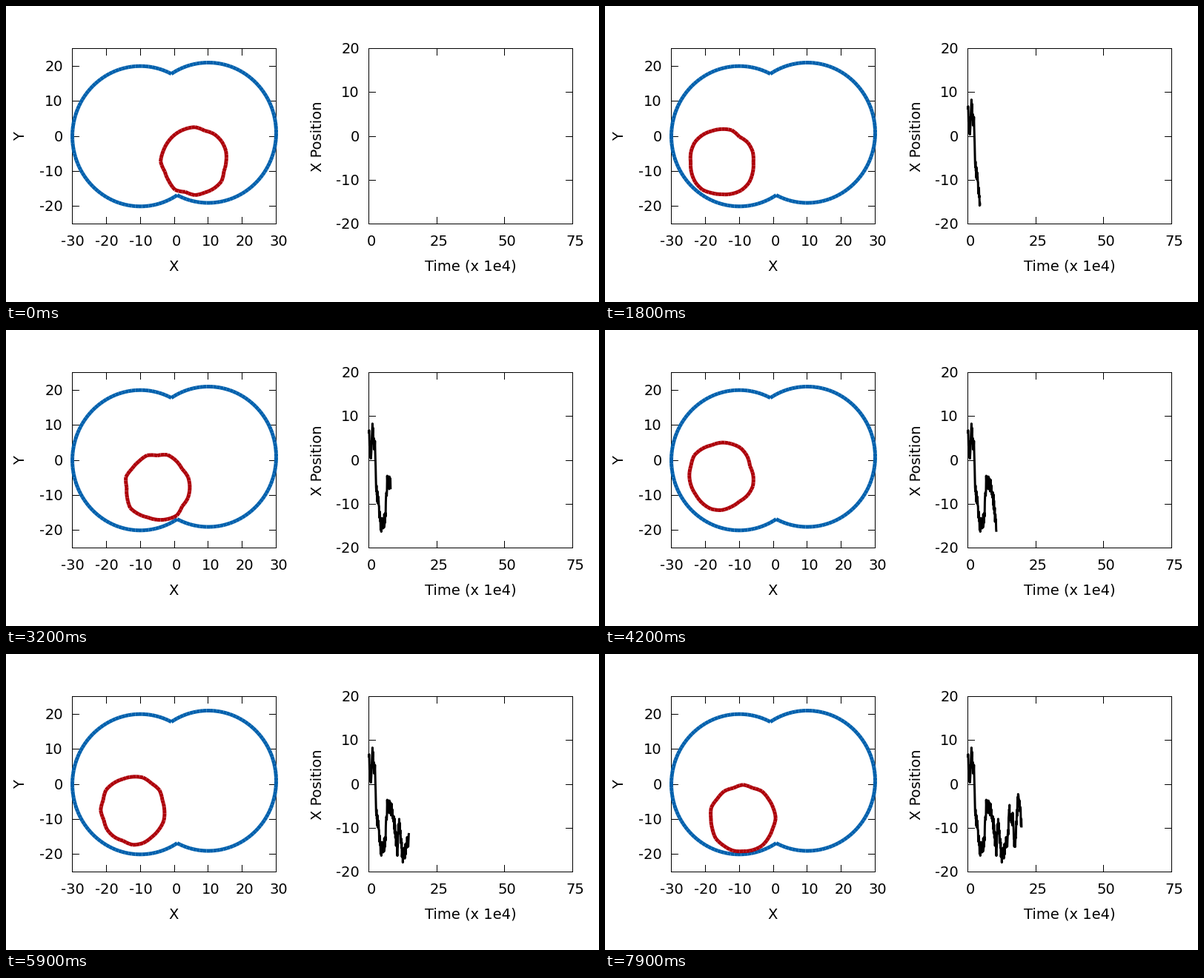
Write a matplotlib script that moves like this. It is 800 px wide and 400 px high and loops after 8 s.

```python
import numpy as np
import matplotlib.pyplot as plt
from matplotlib.animation import FuncAnimation
from matplotlib.collections import LineCollection

W, H, DPI = 800, 400, 100
FRAMES, STEP_MS = 80, 100
PX = 72 / DPI  # points per pixel
BLUE, RED = "#0060ad", "#ad0009"
TOP, BOTTOM, WIDE, TICK = 57.5, 294.5, 275, 9

plt.rcParams["font.family"] = "DejaVu Sans"
fig = plt.figure(figsize=(W / DPI, H / DPI), dpi=DPI, facecolor="white")
ax = fig.add_axes([0, 0, 1, 1])
ax.set_xlim(0, W)
ax.set_ylim(H, 0)
ax.axis("off")


def label(x, y, s, **kw):
    ax.text(x, y, s, fontsize=14, color="black", va="baseline", **kw)


def line(xs, ys):
    """One-pixel line, moved onto pixel centres."""
    ax.plot(np.floor(xs) + 0.5, np.floor(ys) + 0.5, color="black", lw=PX,
            zorder=1, snap=False, solid_capstyle="projecting")


class Panel:
    """Boxed plot with mirrored inward ticks."""

    def __init__(self, left, xr, yr, xticks, yticks):
        self.left, self.xr, self.yr = left, xr, yr
        right = left + WIDE
        line([left, right, right, left, left], [TOP, TOP, BOTTOM, BOTTOM, TOP])
        for v in xticks:
            x = self.x(v)
            line([x, x], [TOP, TOP + TICK])
            line([x, x], [BOTTOM, BOTTOM - TICK])
            label(x + (3.3 if v >= 0 else 0.5), 324, str(v), ha="center")
        for v in yticks:
            y = self.y(v)
            line([left, left + TICK], [y, y])
            line([right, right - TICK], [y, y])
            label(left - 12.5, y + 6.6, str(v), ha="right")

    def x(self, v):
        lo, hi = self.xr
        return self.left + (v - lo) / (hi - lo) * WIDE

    def y(self, v):
        lo, hi = self.yr
        return BOTTOM - (v - lo) / (hi - lo) * (BOTTOM - TOP)

    def names(self, xname, yname, yname_x):
        label(self.left + WIDE / 2 - 0.5, 358, xname, ha="center")
        label(yname_x, 176, yname, ha="center", rotation=90,
              rotation_mode="anchor")


cell = Panel(89.5, (-30, 30), (-25, 25), range(-30, 31, 10), range(-20, 21, 10))
cell.names("X", "Y", 25)
plot = Panel(489.5, (0, 75), (-20, 20), range(0, 76, 25), range(-20, 21, 10))
plot.names("Time (x 1e4)", "X Position", 426)


def arc(cx, cy, r, a):
    """Short separate strokes along a curve, in cell units."""
    p = np.column_stack([cell.x(cx + r * np.cos(a)), cell.y(cy + r * np.sin(a))])
    return np.stack([p[:-1], p[1:]], axis=1)


def strokes(color, z):
    return ax.add_collection(LineCollection(
        [], colors=color, linewidths=5 * PX, capstyle="butt", zorder=z))


def wall(a=(-10, 0), b=(10, 1), r=20):
    """Two overlapping circles, cut where they meet."""
    dx, dy = b[0] - a[0], b[1] - a[1]
    axis, half = np.arctan2(dy, dx), np.arccos(np.hypot(dx, dy) / 2 / r)
    sweep = np.linspace(half, 2 * np.pi - half, 85)
    return np.concatenate([arc(*a, r, axis + sweep),
                           arc(*b, r, axis + np.pi + sweep)])


strokes(BLUE, 3).set_segments(wall())

# Turning points of the wandering cell: (step, position)
X_TURNS = [(0, 6.1), (3, 0.5), (5, 7), (9, 3), (11, -6), (18, -15.2),
           (24, -13.5), (27, -5), (32, -5), (38, -9.5), (42, -15.3),
           (44, -8.5), (50, -17), (59, -12.2), (61, -6), (66, -8),
           (69, -14), (71, -10.3), (74, -2.5), (77, -6), (79, -8.9)]
Y_TURNS = [(0, -7.2), (18, -7.4), (32, -7.8), (42, -4.4), (59, -7.4),
           (71, -1.9), (79, -9.7)]


def path(turns, t):
    return np.interp(t, *zip(*turns))


# Recorded position: the path plus fast noise
SUB = 3
steps = np.arange((FRAMES - 1) * SUB + 1) / SUB
noise = np.random.default_rng(7).uniform(-1.7, 1.7, steps.size)
noise[0] = 0
trace_x = plot.x(steps / 4)
trace_y = plot.y(path(X_TURNS, steps) + noise)

KNOTS = 20
angles = np.linspace(0, 2 * np.pi, 61)


def membrane(i):
    """Ring with randomly dented radius, new at every step."""
    radii = np.random.default_rng(100 + i).normal(9.5, 0.28, KNOTS)
    r = np.interp(angles, np.arange(KNOTS) * 2 * np.pi / KNOTS, radii,
                  period=2 * np.pi)
    return arc(path(X_TURNS, i), path(Y_TURNS, i), r, angles)


ring = strokes(RED, 4)
trace, = ax.plot([], [], color="black", lw=3 * PX, zorder=3,
                 solid_joinstyle="round", solid_capstyle="butt")


def draw(i):
    ring.set_segments(membrane(i))
    n = i * SUB + 1 if i else 0
    trace.set_data(trace_x[:n], trace_y[:n])
    return ring, trace


anim = FuncAnimation(fig, draw, frames=FRAMES, interval=STEP_MS,
                     repeat=True, repeat_delay=0, blit=False)
plt.show()
```
